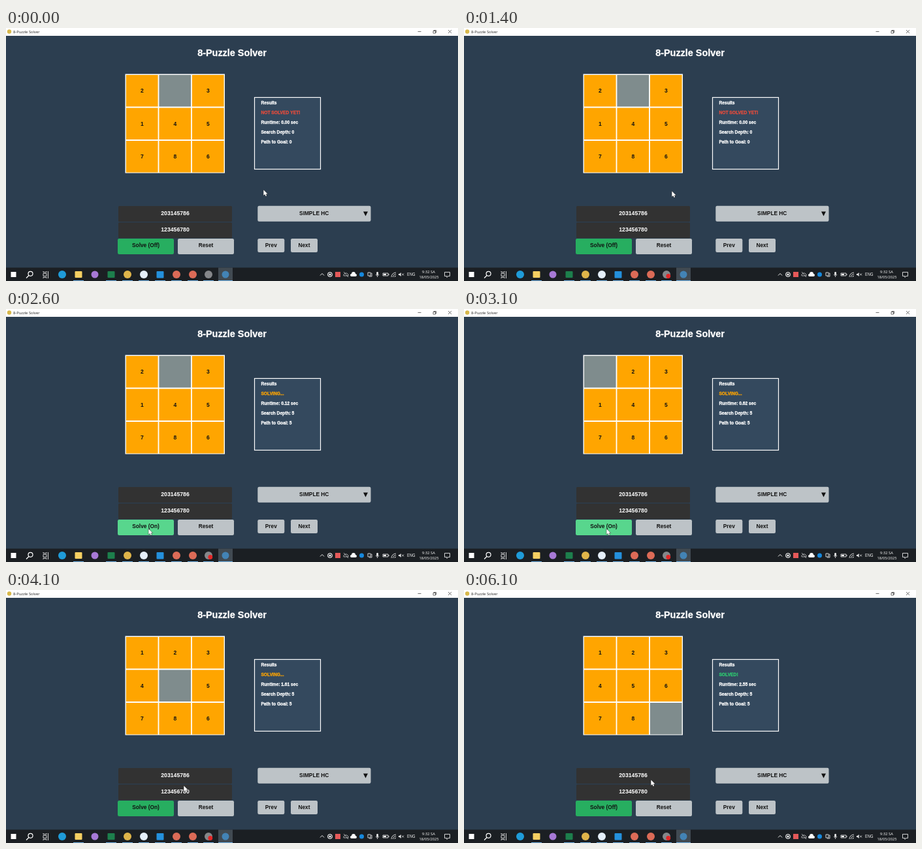
Write an HTML page with a canvas that moves like this. It is 692 by 388 pixels and loops after 6.9 s.

```html
<!DOCTYPE html>
<html lang="en">
<head>
<meta charset="utf-8">
<title>8-Puzzle Solver</title>
<style>
  html, body { margin: 0; width: 100%; height: 100%; overflow: hidden; background: #2c3e50; }
  canvas { display: block; }
</style>
</head>
<body>
<canvas id="stage" width="692" height="388"></canvas>
<script>
const ctx = document.getElementById('stage').getContext('2d');
const LOOP = 6900, STEP = 100;
const SOLVE_START = 2600, SOLVE_END = 5100, MOVE_SECONDS = 0.51;
const BOLD = '"Liberation Sans", Arial, sans-serif';
const UI = '"Open Sans", "Noto Sans", sans-serif';
const START = '203145786', GOAL = '123456780';
const BLANK_PATH = [1, 0, 3, 4, 5, 8];

// Each key is [time, ...values]
const CURSOR = [[0, 394, 248], [700, 340, 250], [1200, 340, 250], [1400, 318, 250],
  [1800, 226, 335], [2000, 218, 337], [3900, 218, 337], [4100, 272, 300],
  [4400, 286, 291], [LOOP, 286, 291]];
const RUNTIME = [[SOLVE_START, 0.12], [3100, 0.62], [4100, 1.61], [5000, 2.48], [SOLVE_END, 2.55]];

function sample(keys, t) {
  if (t <= keys[0][0]) return keys[0].slice(1);
  const next = keys.findIndex(key => key[0] > t);
  if (next < 0) return keys[keys.length - 1].slice(1);
  const a = keys[next - 1], b = keys[next];
  const k = (t - a[0]) / (b[0] - a[0]);
  return a.slice(1).map((v, i) => v + (b[i + 1] - v) * k);
}

function rect(x, y, w, h, fill, radius = 0) {
  ctx.fillStyle = fill;
  ctx.beginPath();
  ctx.roundRect(x, y, w, h, radius);
  ctx.fill();
}

function circle(x, y, r, fill) {
  ctx.fillStyle = fill;
  ctx.beginPath();
  ctx.arc(x, y, r, 0, Math.PI * 2);
  ctx.fill();
}

function line(path, color = '#fff', width = 0.9) {
  ctx.strokeStyle = color;
  ctx.lineWidth = width;
  ctx.stroke(new Path2D(path));
}

function shape(path, color) {
  ctx.fillStyle = color;
  ctx.fill(new Path2D(path));
}

function text(str, x, y, size, color, { align = 'center', font = 'bold', family = BOLD, heavy = 0 } = {}) {
  ctx.font = `${font} ${size}px ${family}`;
  ctx.textAlign = align;
  ctx.textBaseline = 'alphabetic';
  ctx.fillStyle = color;
  ctx.fillText(str, x, y);
  if (heavy) {
    ctx.strokeStyle = color;
    ctx.lineWidth = heavy;
    ctx.strokeText(str, x, y);
  }
}

function button(label, x, y, w, h, fill) {
  rect(x, y, w, h, fill, 2.2);
  text(label, x + w / 2, 336.2, 8.3, '#111');
}

function drawTitleBar() {
  rect(0, 0, 692, 12, '#fff');
  circle(5, 5.5, 3.2, '#d8b84a');
  text('8-Puzzle Solver', 11, 8, 5.8, '#222', { align: 'left', font: 'normal', family: UI });
  line('M630.5 5.5h5M654 4.5h3.5v3.5h-3.5zM655 4.5v-1h3.5v3.5h-1M677 3l5 5M682 3l-5 5', '#333', 0.7);
}

function drawBoard(moves) {
  const tiles = [...START];
  for (let i = 0; i < moves; i++) {
    const from = BLANK_PATH[i], to = BLANK_PATH[i + 1];
    [tiles[from], tiles[to]] = [tiles[to], tiles[from]];
  }
  const cell = 50.5;
  rect(182.5, 70.5, 152.5, 152, '#fff');
  tiles.forEach((digit, i) => {
    const x = 183 + i % 3 * cell, y = 71 + Math.floor(i / 3) * cell;
    const blank = digit === '0';
    rect(x + 0.9, y + 0.9, cell - 1.8, cell - 1.8, blank ? '#7f8c8d' : '#ffa500');
    if (!blank) text(digit, x + cell / 2, y + 28.2, 8.5, '#111');
  });
}

function drawResults(t, runtime) {
  const depth = t < SOLVE_START ? 0 : 5;
  const status = t < SOLVE_START ? ['NOT SOLVED YET!', '#e74c3c']
    : t < SOLVE_END ? ['SOLVING...', '#ffa500'] : ['SOLVED!', '#2ecc71'];
  rect(380.5, 106.5, 101, 110, '#34495e');
  ctx.strokeStyle = '#fff';
  ctx.lineWidth = 1.2;
  ctx.strokeRect(380.5, 106.5, 101, 110);
  const rows = [['Results'], status, [`Runtime: ${runtime.toFixed(2)} sec`],
    [`Search Depth: ${depth}`], [`Path to Goal: ${depth}`]];
  rows.forEach(([label, color = '#fff'], i) =>
    text(label, 390.4, 116.8 + i * 15.15, 6.7, color, { align: 'left', heavy: 0.3 }));
}

function drawControls(t, hovered) {
  [START, GOAL].forEach((state, i) => {
    rect(172, 273 + i * 25.2, 174, 24, '#323232', 1.5);
    text(state, 259, 287.2 + i * 25.2, 8.7, '#fff');
  });
  const running = t >= SOLVE_START && t < SOLVE_END;
  button(`Solve (${running ? 'On' : 'Off'})`, 171, 323, 86, 24, hovered ? '#58d68d' : '#27ae60');
  button('Reset', 263, 323, 86, 24, '#bdc3c7');
  button('Prev', 385.3, 323, 41, 21, '#bdc3c7');
  button('Next', 436, 323, 41, 21, '#bdc3c7');
  rect(385.3, 272.7, 173.2, 24, '#bdc3c7', 2.2);
  text('SIMPLE HC', 471.7, 287.2, 8.3, '#111');
  shape('M547 281.5h7l-3.5 7z', '#111');
}

function drawTaskbar(t) {
  rect(0, 367.5, 692, 20.5, '#1b1f23');
  rect(325, 367.5, 22, 20.5, '#414a52');
  [111, 161, 186, 211, 236, 261, 286, 310].forEach(x => rect(x - 8, 387, 16, 1, '#76b9ed'));
  rect(325, 387, 22, 1, '#76b9ed');

  rect(7.5, 374, 8, 8, '#fff');
  ctx.beginPath();
  ctx.arc(37.5, 376.8, 3.5, 0, Math.PI * 2);
  ctx.strokeStyle = '#fff';
  ctx.lineWidth = 1.2;
  ctx.stroke();
  line('M35 379.5l-4 4', '#fff', 1.3);
  line('M57 376.5h5v4h-5zM57 373v1.5h5v-1.5M57 384v-1.5h5v1.5M64.5 373v11', '#fff', 0.8);

  circle(86, 378, 6, '#1f9bd8');
  rect(105.5, 373, 11, 10, '#f5cf62', 1);
  circle(136, 378, 5.5, '#a779d6');
  rect(155.5, 373, 11, 10, '#1d7f4c', 1);
  circle(186, 378, 6, '#dfb44a');
  circle(211, 378, 6, '#e5effa');
  rect(230.5, 373, 11, 10.5, '#2490dc', 1);
  circle(261, 378, 6, '#dc6b57');
  circle(286, 378, 6, '#dc6b57');
  circle(310, 378, 6, '#85878a');
  if (t >= 300) circle(312.8, 380.5, 3.4, '#e32626');
  circle(336, 378, 5.5, '#4383b5');

  line('M481 379.5l3-3 3 3');
  circle(496, 378, 3.8, '#fff');
  circle(496, 378, 2.7, '#1b1f23');
  circle(496, 378, 1.6, '#fff');
  rect(504, 374, 8, 8, '#e45959');
  line('M517 380v-2l2-2h3l2 2v2zM517 374l7 8', '#c8c8c8', 0.8);
  shape('M529 381a2 2 0 0 1 0-4a3 3 0 0 1 6 0a2 2 0 0 1 0 4z', '#fff');
  circle(544.5, 378, 3.5, '#1688dc');
  line('M554 375h4v5h-4zM559 376h1v5h-4', '#fff', 0.8);
  rect(567.3, 374, 2.6, 5, '#fff', 1.3);
  line('M566 378q2.6 4 5.2 0M568.6 380v2', '#fff', 0.7);
  line('M577 376h8v4h-8zM586 377v2', '#fff', 0.8);
  rect(578, 377, 4, 2, '#fff');
  line('M590 382a7 7 0 0 1 7-7M592.5 382a4.5 4.5 0 0 1 4.5-4.5M595 382a2 2 0 0 1 2-2', '#fff', 0.8);
  shape('M601 377h1.5l2-2v6l-2-2h-1.5z', '#fff');
  line('M606 376.5l3 3M609 376.5l-3 3', '#fff', 0.7);
  line('M671.5 374.5h8v6h-3l-1.5 2v-2h-3.5z', '#fff', 0.8);

  const plain = { font: 'normal', family: UI };
  text('ENG', 620.3, 380.3, 6.2, '#fff', plain);
  text('9:32 SA', 647, 375.6, 5.8, '#fff', plain);
  text('18/05/2025', 647.5, 384.3, 5.7, '#fff', plain);
}

function drawCursor(x, y) {
  ctx.save();
  ctx.translate(x, y);
  const arrow = 'M0.3 0.3V8.8L2.3 7L3.6 10L5.1 9.3L3.8 6.4H6.5Z';
  line(arrow, '#1a1a1a', 0.9);
  shape(arrow, '#fff');
  ctx.restore();
}

function draw(t) {
  const [x, y] = sample(CURSOR, t);
  const hovered = x >= 171 && x < 257 && y >= 323 && y < 347;
  const runtime = t < SOLVE_START ? 0 : sample(RUNTIME, t)[0];
  const moves = Math.floor(runtime / MOVE_SECONDS + 1e-6);

  rect(0, 0, 692, 388, '#2c3e50');
  drawTitleBar();
  text('8-Puzzle Solver', 346, 43, 14.4, '#fff', { heavy: 0.3 });
  drawBoard(moves);
  drawResults(t, runtime);
  drawControls(t, hovered);
  drawTaskbar(t);
  drawCursor(x, y);
}

const startTime = performance.now();
function frame() {
  const elapsed = (performance.now() - startTime) % LOOP;
  draw(Math.floor(elapsed / STEP) * STEP);
  requestAnimationFrame(frame);
}
frame();
</script>
</body>
</html>
```
